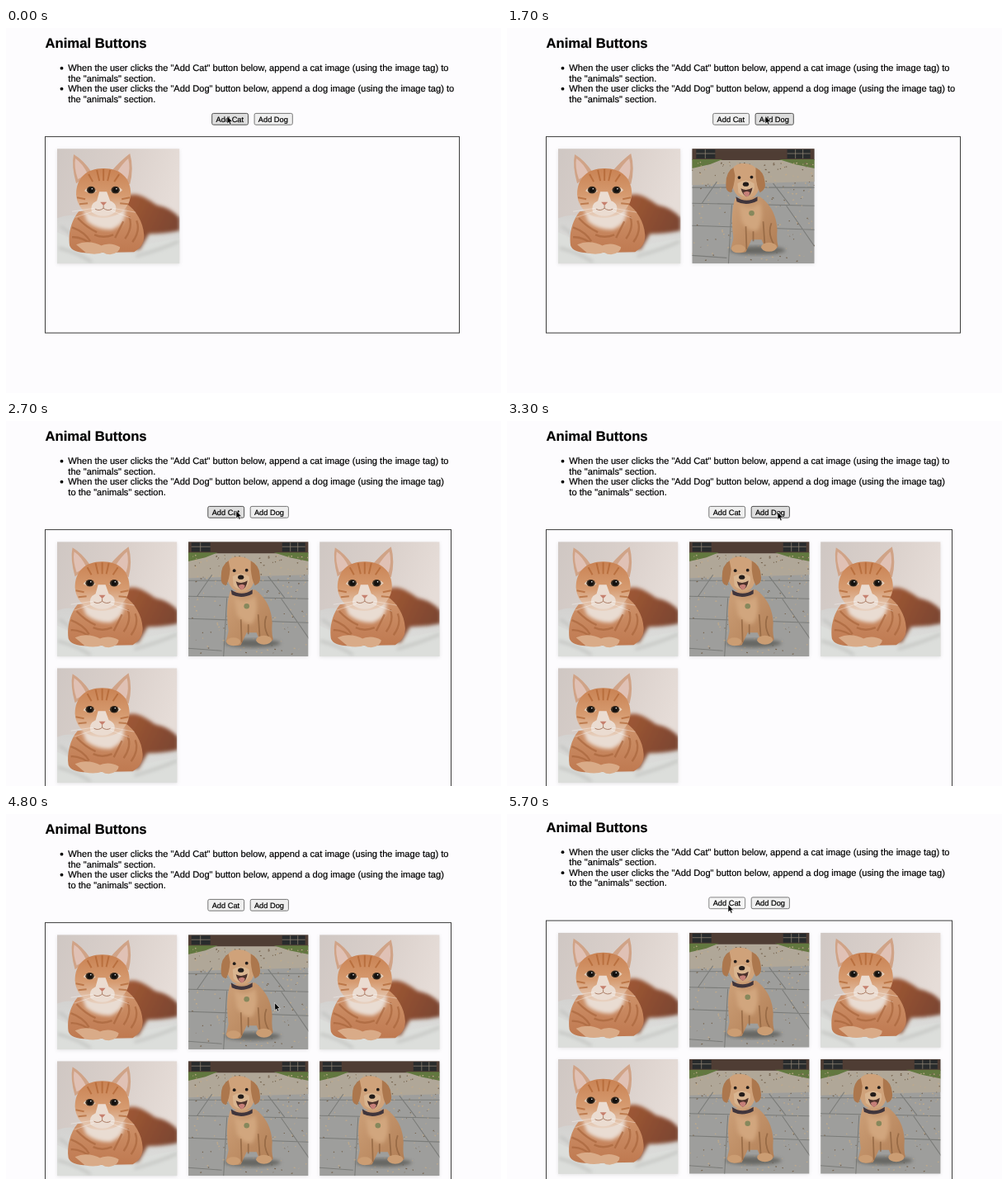
An HTML page that plays this animation: 600x442 px, repeating every 5800 ms.

```html
<!DOCTYPE html>
<html lang="en">
<head>
<meta charset="utf-8">
<title>Animal Buttons</title>
<style>
  html, body { margin: 0; width: 100%; height: 100%; overflow: hidden; background: #fdfcfe; }
  #stage { display: block; width: 600px; height: 442px; font: 11.115px "Liberation Sans", Arial, sans-serif; }
  text { stroke: #000; stroke-width: .2px; text-rendering: geometricPrecision; }
  .title { font-size: 16.67px; font-weight: bold; }
  .button { font-size: 9.27px; }
  .photo { filter: drop-shadow(0 1.4px 2px #00000018); }
</style>
</head>
<body>
<svg id="stage" viewBox="0 0 600 442">
  <defs>
    <linearGradient id="wall" x2="1" y2=".3">
      <stop stop-color="#cfc7c3"/><stop offset=".55" stop-color="#dad0cb"/><stop offset="1" stop-color="#e6ddd8"/>
    </linearGradient>
    <linearGradient id="bed" x2="0" y2="1">
      <stop stop-color="#d3d2d0"/><stop offset="1" stop-color="#e1e2e0"/>
    </linearGradient>
    <linearGradient id="back" x2="1" y2=".4">
      <stop stop-color="#a95d36"/><stop offset="1" stop-color="#7d4630"/>
    </linearGradient>
    <linearGradient id="chest" x2="0" y2="1">
      <stop stop-color="#cf946c"/><stop offset="1" stop-color="#bf7950"/>
    </linearGradient>
    <linearGradient id="face" x2="0" y2="1">
      <stop stop-color="#c98253"/><stop offset=".55" stop-color="#d69b70"/><stop offset="1" stop-color="#e8d3c3"/>
    </linearGradient>
    <linearGradient id="coat" x2="1" y2="1">
      <stop stop-color="#cda078"/><stop offset="1" stop-color="#b07d54"/>
    </linearGradient>
    <filter id="soft" x="-20%" y="-20%" width="140%" height="140%"><feGaussianBlur stdDeviation="2"/></filter>

    <symbol id="cat" viewBox="0 0 148 139" preserveAspectRatio="xMidYMid slice">
      <rect width="148" height="139" fill="url(#wall)"/>
      <path d="M0 84Q14 78 28 82L148 82V139H0Z" fill="url(#bed)"/>
      <path d="M0 101Q24 111 45 128L148 108V139H0Z" fill="#dcdedb"/>
      <path d="M4 94Q20 103 32 124M95 130Q125 122 147 112M2 120Q25 126 42 137" fill="none" stroke="#bdbebb" stroke-width="2.5" filter="url(#soft)"/>
      <path d="M80 60C94 49 108 60 120 68Q139 72 148 84V99Q130 103 111 103L100 122H65Z" fill="url(#back)" filter="url(#soft)"/>
      <path d="M26 76C17 87 13 103 15 117Q18 127 42 126L93 125Q106 117 105 104C104 88 95 75 86 68Z" fill="url(#chest)"/>
      <path d="M31 74Q55 84 82 72Q85 90 66 98Q47 98 36 88Z" fill="#e9dcd2" filter="url(#soft)"/>
      <path d="M18 95Q34 101 40 112M18 107Q30 106 45 118M25 84Q35 95 48 101M87 82Q92 95 82 109M96 87Q101 99 91 113M80 88L70 108M45 104Q56 109 68 104" fill="none" stroke="#a8643b" stroke-width="2.4" opacity=".65"/>
      <path d="M23 116Q38 109 55 118L57 125Q47 129 35 126ZM51 118Q64 112 76 119Q76 126 64 128Q54 128 51 118Z" fill="#d9ab88"/>
      <path d="M23 42Q17 21 20 7Q32 14 42 29ZM65 28Q77 14 88 6Q93 24 88 43Z" fill="#d0a387"/>
      <path d="M25 37Q20 22 22 12Q31 18 37 31ZM72 29Q80 17 86 12Q89 24 85 37Z" fill="#e0c1b5"/>
      <path d="M23 55C23 36 35 24 56 24S89 36 89 55Q88 71 74 79Q56 88 39 80Q24 72 23 55Z" fill="url(#face)"/>
      <path d="M56 25V39M48 26L51 39M64 26L61 39M38 31L43 40M75 31L69 40M24 59L34 61M88 59L78 61M27 67L37 66M86 67L76 66" fill="none" stroke="#ae622f" stroke-width="2" opacity=".65"/>
      <path d="M51 52H60L64 63Q74 67 70 77Q56 86 42 77Q39 67 48 63Z" fill="#ebdcd1"/>
      <path d="M33 51Q38 43 48 51Q42 57 33 51ZM64 51Q73 43 79 50Q72 57 64 51Z" fill="#e6cfba"/>
      <g fill="#3b2d20"><ellipse cx="41" cy="50" rx="5.2" ry="4.3"/><ellipse cx="70.5" cy="50" rx="5.2" ry="4.3"/></g>
      <g fill="#12100e"><circle cx="41" cy="50" r="3.2"/><circle cx="70.5" cy="50" r="3.2"/></g>
      <g fill="#fff"><circle cx="42.2" cy="48.6" r=".8"/><circle cx="71.7" cy="48.6" r=".8"/></g>
      <path d="M52 64.5H60L56 69Z" fill="#c6806e"/>
      <path d="M56 69V72Q51 76 46 73M56 72Q61 76 66 73" fill="none" stroke="#a4735b" stroke-width=".9"/>
      <path d="M45 72L18 76M46 75L22 83M67 72L95 77M66 75L89 84" stroke="#fff" stroke-width=".5" opacity=".7"/>
    </symbol>

    <symbol id="dog" viewBox="0 0 148 139" preserveAspectRatio="xMidYMid slice">
      <rect width="148" height="139" fill="#9e9e9c"/>
      <path d="M0 13H148V40L0 44Z" fill="#b0a798"/>
      <path d="M0 0H148V14H0Z" fill="#4f3d34"/>
      <path d="M5 1H28V12H5ZM115 1H143V12H115Z" fill="#282b2c"/>
      <path d="M16 1V12M125 1V12M134 1V12M5 6H28M115 6H143" stroke="#8b8070" stroke-width=".8"/>
      <path d="M0 13H37L22 19L0 24ZM105 13H148V24L124 19Z" fill="#62783f"/>
      <path d="M0 47H148M0 66L148 69M0 93L148 98M30 40L12 66M48 68L44 139M98 42L118 68M114 69L148 118M0 129L42 132" fill="none" stroke="#7b7c79" stroke-width="1.1"/>
      <path id="shade" fill="none" stroke="#75634e" stroke-width="1.2"/>
      <path id="leaves" fill="none" stroke="#c0aa8a" stroke-width="1.3"/>
      <ellipse cx="79" cy="123" rx="34" ry="5" fill="#686764" filter="url(#soft)"/>
      <path d="M52 60C47 77 48 92 50 108L47 121Q53 128 65 125L72 110L84 110L89 122Q99 125 104 118Q102 111 103 98C102 77 92 65 82 58Z" fill="url(#coat)"/>
      <path d="M57 67Q70 76 82 65Q88 84 79 99Q68 101 60 88Z" fill="#d1a67e" filter="url(#soft)"/>
      <path d="M65 94L66 122M86 88L88 117M96 90Q91 102 99 116M74 100V112" fill="none" stroke="#8f633f" stroke-width="1.8" opacity=".75"/>
      <g fill="#cb9d73"><ellipse cx="56" cy="121" rx="8.5" ry="5"/><ellipse cx="93" cy="119" rx="9.5" ry="5.5"/></g>
      <path d="M53 58Q66 67 79 58L79 63Q66 70 54 64Z" fill="#40353c"/>
      <circle cx="72" cy="78" r="3.3" fill="#86885c"/>
      <path d="M47 36Q46 20 59 18Q77 17 81 31Q85 47 76 57Q66 64 55 57Q48 50 47 36Z" fill="#cfa27a"/>
      <path d="M50 23Q41 28 41 42Q40 52 47 53Q51 46 52 33ZM77 23Q87 28 88 40Q90 50 82 53Q78 46 77 33Z" fill="#ac774d"/>
      <path d="M55 42Q65 35 75 42Q77 51 69 57Q62 59 56 53Z" fill="#d9b590"/>
      <path d="M59 48Q66 52 73 47Q72 56 66 58Q61 56 59 48Z" fill="#4d322c"/>
      <path d="M62 53Q67 50 70 53Q69 58 66 58Q63 57 62 53Z" fill="#c67f78"/>
      <g fill="#211b19"><circle cx="57" cy="35" r="1.9"/><circle cx="72" cy="34.5" r="1.9"/><ellipse cx="65" cy="43" rx="3.6" ry="2.6"/></g>
    </symbol>
  </defs>

  <rect width="600" height="442" fill="#fdfcfe"/>
  <g id="page">
    <text class="title" x="47.5" y="24">Animal Buttons</text>
    <circle cx="67.5" cy="48.7" r="1.9"/>
    <circle cx="67.5" cy="73.7" r="1.9"/>
    <text x="75.3" y="52">When the user clicks the "Add Cat" button below, append a cat image (using the image tag) to</text>
    <text x="75.3" y="64.5">the "animals" section.</text>
    <text id="wrapTop" x="75.3" y="77"></text>
    <text id="wrapEnd" x="75.3" y="89.5"></text>
    <g id="buttons" class="button">
      <g id="catButton">
        <rect x="249.7" y="103.4" width="43.8" height="13.8" rx="1.8"/>
        <text x="254.6" y="113.5">Add Cat</text>
      </g>
      <g id="dogButton">
        <rect x="301.1" y="103.4" width="46.2" height="13.8" rx="1.8"/>
        <text x="305.8" y="113.5">Add Dog</text>
      </g>
    </g>
    <rect id="frame" x="47.5" y="131.6" fill="none" stroke="#3c3c3c"/>
    <g id="photos"></g>
  </g>
  <path id="cursor" d="M0 0V9.4L2.1 7.5L3.6 10.8L5.2 10.1L3.8 6.9H6.6Z" stroke="#fff" stroke-width=".6"/>
</svg>
<script>
const LOOP = 5800, STEP = 100, NARROW_AT = 2500, SCROLL_AT = 5000;
const el = id => document.getElementById(id);
const set = (node, attrs) => { for (const k in attrs) node.setAttribute(k, attrs[k]); };

const animals = [["cat", 0], ["dog", 1300], ["cat", 2000], ["cat", 2500], ["dog", 3500], ["dog", 4100]];

// time, x, y of the pointer tip
const path = [
  [600, 268, 106.5], [1100, 313, 106.5], [1800, 313, 106.5], [2000, 279, 108.5], [2900, 279, 108.5],
  [3200, 328, 110], [4200, 328, 110], [4600, 325.7, 228.5], [5300, 325.7, 228.5], [5600, 268, 109.5]
];

// button, state, from, to
const states = [
  ["cat", "hover", 0, 800], ["dog", "hover", 1000, 1100], ["dog", "active", 1100, 1300],
  ["dog", "hover", 1300, 1900], ["cat", "hover", 2000, 2400], ["cat", "active", 2400, 2500],
  ["cat", "hover", 2500, 3000], ["dog", "hover", 3100, 3400], ["dog", "active", 3400, 3500],
  ["dog", "hover", 3500, 3900], ["dog", "active", 3900, 4100], ["dog", "hover", 4100, 4300],
  ["cat", "hover", 5600, 5700], ["cat", "active", 5700, LOOP]
];
const looks = {
  idle: { fill: "#efefef", stroke: "#767676" },
  hover: { fill: "#dedede", stroke: "#4f4f4f" },
  active: { fill: "#f5f5f5", stroke: "#858585" }
};

let seed = 17;
const rand = () => (seed = seed * 16807 % 2147483647) / 2147483647;

function scatter(id, count) {
  let d = "";
  for (let i = 0; i < count; i++) {
    const y = 17 + 120 * rand() ** 1.7;
    d += `M${rand() * 148} ${y}l${rand() * 4 - 2} ${rand() * 2 - 1}`;
  }
  set(el(id), { d });
}

function pointer(t) {
  const next = path.findIndex(p => p[0] > t);
  if (next === 0) return path[0].slice(1);
  if (next < 0) return path.at(-1).slice(1);
  const [a, b] = [path[next - 1], path[next]];
  const u = (t - a[0]) / (b[0] - a[0]), e = u * u * (3 - 2 * u);
  return [1, 2].map(i => a[i] + (b[i] - a[i]) * e);
}

function paintButton(name, t) {
  const hit = states.find(([who, , from, to]) => who === name && t >= from && t < to);
  set(el(name + "Button").firstElementChild, looks[hit ? hit[1] : "idle"]);
}

const photos = animals.map(([kind]) => {
  const use = document.createElementNS("http://www.w3.org/2000/svg", "use");
  set(use, { href: "#" + kind, class: "photo", height: 139 });
  return el("photos").appendChild(use);
});

function render(time) {
  const t = Math.floor(time % LOOP / STEP) * STEP;
  const narrow = t >= NARROW_AT;
  const width = narrow ? 145.2 : 148.4, pitch = narrow ? 159.1 : 162.3;

  set(el("page"), { transform: `translate(0 ${t >= SCROLL_AT ? -2.5 : 0})` });
  el("wrapTop").textContent = 'When the user clicks the "Add Dog" button below, append a dog image (using the image tag)' + (narrow ? "" : " to");
  el("wrapEnd").textContent = (narrow ? "to " : "") + 'the "animals" section.';
  set(el("buttons"), { transform: `translate(${narrow ? -4.9 : 0} 0)` });
  paintButton("cat", t);
  paintButton("dog", t);
  set(el("frame"), { width: narrow ? 492 : 502, height: narrow ? 321 : 237.6 });
  photos.forEach((photo, i) => set(photo, {
    x: 62 + i % 3 * pitch, y: 146.2 + Math.floor(i / 3) * 153, width,
    visibility: t >= animals[i][1] ? "visible" : "hidden"
  }));
  set(el("cursor"), { transform: `translate(${pointer(t)})` });
}

scatter("shade", 110);
scatter("leaves", 130);
const start = performance.now();
(function tick() {
  render(performance.now() - start);
  requestAnimationFrame(tick);
})();
</script>
</body>
</html>
```
